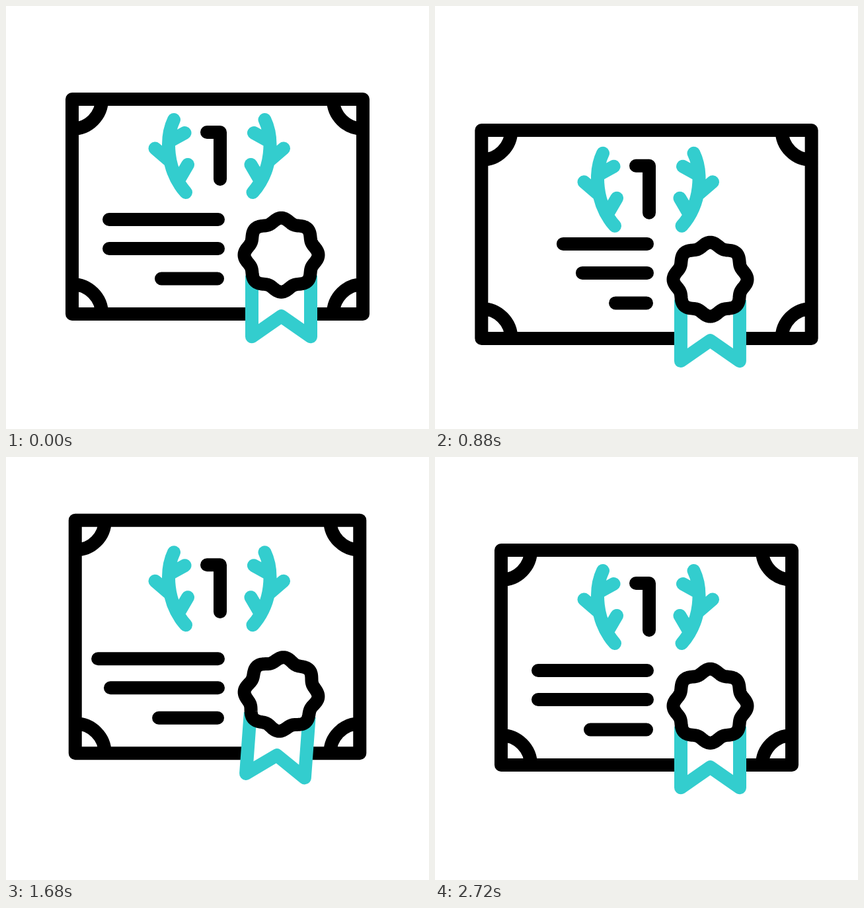
Recreate the animation shown at these times as an HTML page. Size 640 px wide and 640 px high, loop 3000 ms.

```html
<!DOCTYPE html>
<html lang="en">
<head>
<meta charset="utf-8">
<title>Certificate</title>
<style>
  html, body { margin: 0; width: 100%; height: 100%; overflow: hidden; background: #fff; }
  svg { display: block; width: 100%; height: 100%; }
  .ink, .teal { fill: none; stroke-width: 20; stroke-linecap: round; stroke-linejoin: round; }
  .ink { stroke: #000; }
  .teal { stroke: #33cdce; }
  .paper { fill: #fff; }
  .butt { stroke-linecap: butt; }
</style>
</head>
<body>
<svg viewBox="0 0 640 640">
  <defs>
    <path id="branch" d="M254 172C241 199 242 248 272 282M270.5 192L247 205M225.5 215.5L247 234M275 240L261 264"/>
  </defs>
  <path id="sheet" class="ink"/>
  <path id="lines" class="ink"/>
  <g id="award">
    <use href="#branch" class="teal"/>
    <use href="#branch" class="teal" transform="translate(645.5) scale(-1 1)"/>
    <path class="ink" d="M304 191H324V262"/>
  </g>
  <g id="badge">
    <path class="teal paper butt" d="M-44.5 31V123.5L0 92.5L44.5 123.5V31"/>
    <path id="seal" class="ink paper"/>
  </g>
</svg>
<script>
(() => {
  const LOOP = 3000, STEP = 40;
  const el = id => document.getElementById(id);
  const sheet = el('sheet'), lines = el('lines'), award = el('award'), badge = el('badge');

  // Eased track through times and their values
  const track = (times, values) => t => {
    if (t <= times[0]) return values[0];
    const i = times.findIndex(k => t < k);
    if (i < 0) return values[values.length - 1];
    const x = (t - times[i - 1]) / (times[i] - times[i - 1]);
    return values[i - 1] + (values[i] - values[i - 1]) * x * x * (3 - 2 * x);
  };

  const bounce = [120, 720, 1400, 2040, 2600];
  const trim = [120, 800, 1500, 2120, 2720];
  const halfWidth = track(bounce, [220, 258.7, 194, 246.3, 220]);
  const topEdge = track(bounce, [141, 212.4, 38, 179.8, 141]);
  const drop = track(bounce, [0, 51.3, -51.3, 31.3, 0]);
  const lift = track([120, 720, 1400, 2080, 2600], [0, 70.3, -69.5, 43.5, 0]);
  const swing = track([120, 600, 1200, 1780, 2720], [0, 9.1, -11, 5.5, 0]);
  const rows = [
    { y: 323, end: 321, start: track(trim, [156, 196.5, 125, 194, 156]) },
    { y: 367, end: 321, start: track(trim, [156, 226, 141.2, 223.3, 156]) },
    { y: 412.5, end: 320, start: track(trim, [235, 275, 221, 270.5, 235]) }
  ];

  const sealPath = (n = 192) => 'M' + Array.from({ length: n }, (_, i) => {
    const a = i / n * 2 * Math.PI, r = 52.7 + 3.3 * Math.cos(8 * a);
    return (r * Math.cos(a)).toFixed(2) + ' ' + (r * Math.sin(a)).toFixed(2);
  }).join('L') + 'Z';

  // Quarter ring around a sheet corner; sx, sy point inwards
  const corner = (x, y, sx, sy) =>
    `M${x + 45 * sx} ${y}A45 45 0 0 ${sx === sy ? 1 : 0} ${x} ${y + 45 * sy}`;

  function draw(t) {
    const w = halfWidth(t), l = 320 - w, r = 320 + w;
    const d = drop(t), y = topEdge(t), b = 466 + d;
    sheet.setAttribute('d', `M${l} ${y}H${r}V${b}H${l}Z` +
      corner(l, y, 1, 1) + corner(r, y, -1, 1) + corner(l, b, 1, -1) + corner(r, b, -1, -1));
    lines.setAttribute('d', rows.map(k => `M${k.start(t)} ${k.y + d}H${k.end}`).join(''));
    award.setAttribute('transform', `translate(0 ${lift(t)})`);
    badge.setAttribute('transform', `translate(416.5 ${376.7 + d}) rotate(${swing(t)})`);
  }

  function tick() {
    const t = performance.now() % LOOP;
    draw(Math.floor(t / STEP) * STEP);
    requestAnimationFrame(tick);
  }

  el('seal').setAttribute('d', sealPath());
  tick();
})();
</script>
</body>
</html>
```
